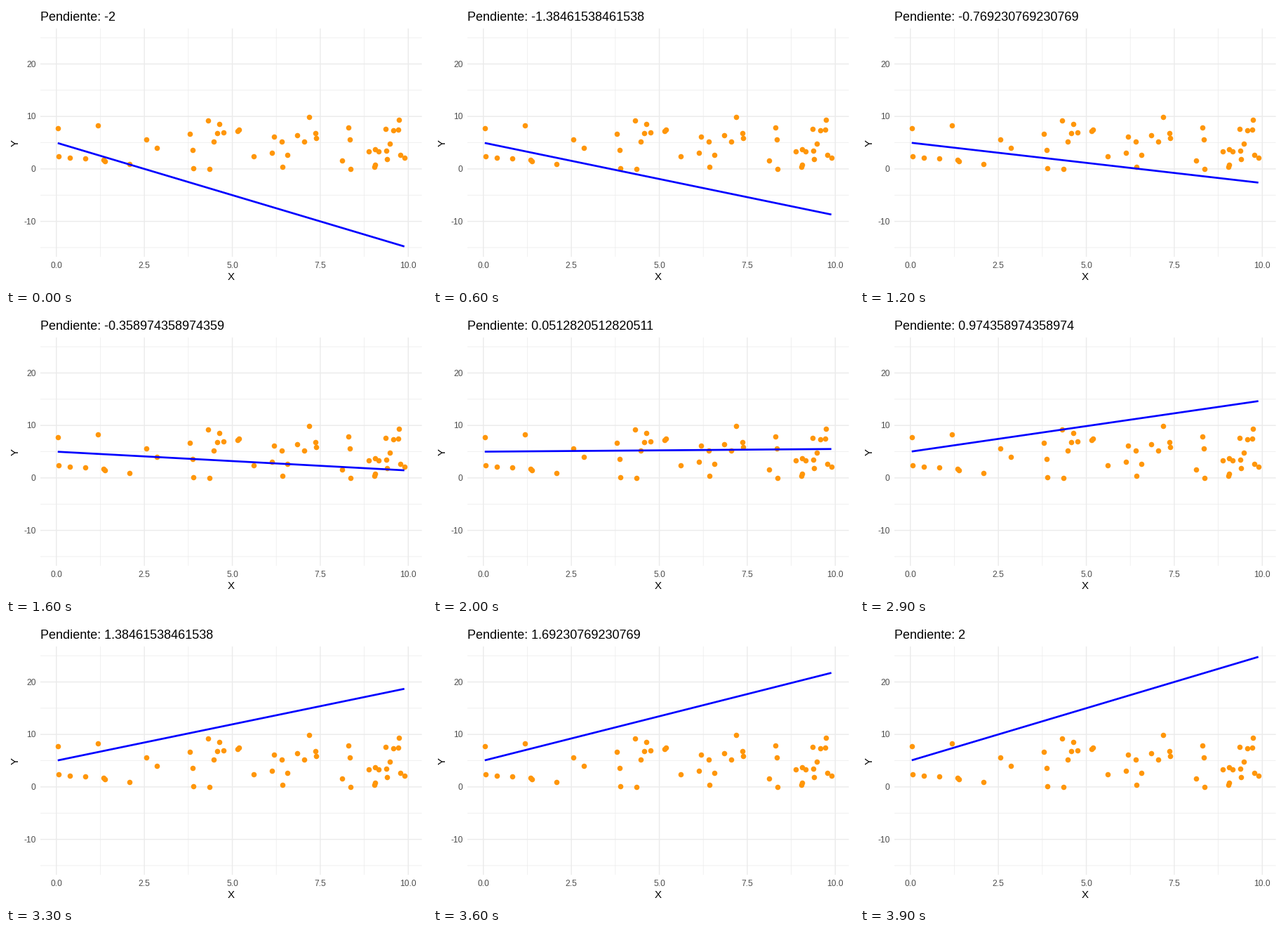
Write a matplotlib script that moves like this. It is 600 by 400 pixels and loops after 4000 ms.

```python
import random

import matplotlib.pyplot as plt
from matplotlib.animation import FuncAnimation

W, H, DPI = 600, 400, 100
FRAMES, INTERVAL = 40, 100
LEFT, RIGHT, TOP, BOTTOM = 49, 592.6, 32, 357
INTERCEPT = 5

plt.rcParams["font.family"] = "Liberation Sans"


def pt(px):
    return px * 72 / DPI


def to_x(v):
    return 71.8 + 50.15 * v


def to_y(v):
    return 231.9 - 7.47 * v


def uniform_source(seed):
    """Mersenne Twister filled by a linear congruential generator."""
    state = []
    for _ in range(675):
        seed = (69069 * seed + 1) % 2**32
        state.append(seed)
    rng = random.Random()
    rng.setstate((3, tuple(state[51:]) + (624,), None))
    return lambda: rng.getrandbits(32) / 2**32


draw = uniform_source(42)
xs = [10 * draw() for _ in range(50)]
ys = [10 * draw() for _ in range(50)]
ends = [min(xs), max(xs)]

fig = plt.figure(figsize=(W / DPI, H / DPI), dpi=DPI, facecolor="white")
ax = fig.add_axes([0, 0, 1, 1])
ax.set_xlim(0, W)
ax.set_ylim(H, 0)
ax.axis("off")


def segment(x, y, width, color, z):
    line, = ax.plot(x, y, lw=pt(width), color=color, zorder=z, snap=False,
                    solid_capstyle="butt")
    return line


def label(x, y, text, size, color="black", ha="center", **kw):
    return ax.text(x, y, text, fontsize=pt(size), color=color, ha=ha,
                   va="baseline", **kw)


def grid(x_values, y_values, width, z):
    for v in x_values:
        segment([to_x(v)] * 2, [TOP, BOTTOM], width, "#ebebeb", z)
    for v in y_values:
        segment([LEFT, RIGHT], [to_y(v)] * 2, width, "#ebebeb", z)


x_ticks = [0, 2.5, 5, 7.5, 10]
y_ticks = [-10, 0, 10, 20]
grid([1.25, 3.75, 6.25, 8.75], [-15, -5, 5, 15, 25], 0.71, 1)
grid(x_ticks, y_ticks, 1.42, 2)

for v in x_ticks:
    label(to_x(v), 373, f"{v:.1f}", 12, "#4d4d4d")
for v in y_ticks:
    label(42.6, to_y(v) + 4.2, str(v), 12, "#4d4d4d", ha="right")
label(320.8, 390, "X", 15)
label(18, 194.6, "Y", 15, rotation=90, rotation_mode="anchor")
title = label(LEFT, 21, "", 18, ha="left")

ax.plot([to_x(v) for v in xs], [to_y(v) for v in ys], "o", ms=pt(7.6),
        mew=0, color="#ff9609", zorder=3)
trend = segment([to_x(v) for v in ends], [0, 0], 2.7, "#0000ff", 4)


def update(i):
    slope = -2 + 4 * i / (FRAMES - 1)
    title.set_text(f"Pendiente: {slope:.15g}")
    trend.set_ydata([to_y(INTERCEPT + slope * v) for v in ends])
    return title, trend


anim = FuncAnimation(fig, update, frames=FRAMES, interval=INTERVAL,
                     repeat=True, repeat_delay=0)
plt.show()
```
